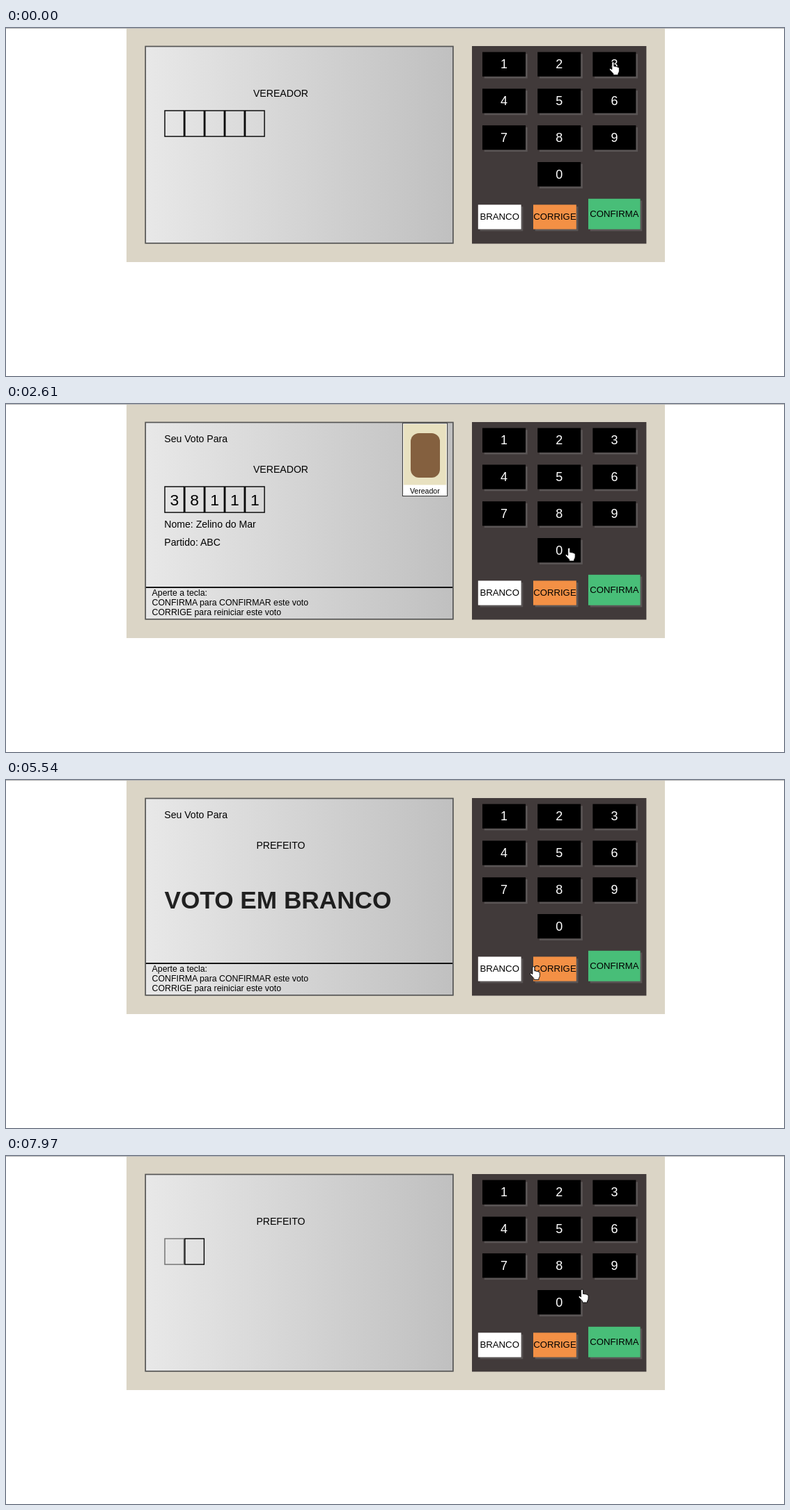
Recreate the animation shown at these times as an HTML page. Size 1117x501 px, loop 8 s.

```html
<!DOCTYPE html>
<html lang="pt-BR">
<head>
<meta charset="utf-8">
<title>Urna</title>
<style>
  html, body { margin: 0; width: 100%; height: 100%; overflow: hidden; background: #fff; }
  svg { display: block; font: 14.08px "Liberation Sans", Arial, sans-serif; }
  .mid { text-anchor: middle; }
  .key { font-size: 18px; fill: #fff; }
  .action { font-size: 13.2px; }
  .digit { font-size: 22.9px; }
  .help { font-size: 12.32px; }
  .big { font-size: 35.2px; font-weight: bold; }
</style>
</head>
<body>
<svg width="1117" height="501" viewBox="0 0 1117 501">
  <defs>
    <linearGradient id="glass">
      <stop stop-color="#e8e8e8"/><stop offset="1" stop-color="#c0c0c0"/>
    </linearGradient>
  </defs>
  <rect x="173" width="773" height="337" fill="#dbd5c6"/>
  <rect width="1117" height="1" fill="#b4b4b4"/>
  <rect x="200.2" y="26.5" width="441.7" height="283.3" fill="url(#glass)" stroke="#555" stroke-width="1.7"/>
  <rect x="669" y="26" width="250.4" height="284.5" fill="#413a3a"/>
  <g id="keys"></g>

  <text id="title" class="mid" x="394.5" y="98.5"></text>
  <g id="cells"></g>
  <text id="big" class="big" x="227.5" y="184.8"></text>
  <g id="summary">
    <text x="227.3" y="54.5">Seu Voto Para</text>
    <rect x="201" y="263.1" width="440" height="1.8"/>
    <g class="help">
      <text x="209.6" y="276.2">Aperte a tecla:</text>
      <text x="209.6" y="290.2">CONFIRMA para CONFIRMAR este voto</text>
      <text x="209.6" y="304.2">CORRIGE para reiniciar este voto</text>
    </g>
  </g>
  <g id="candidate">
    <text x="227.3" y="177.8">Nome: Zelino do Mar</text>
    <text x="227.3" y="204.2">Partido: ABC</text>
    <rect x="569.4" y="27.7" width="64.2" height="104.8" fill="#fff" stroke="#333"/>
    <rect x="570.8" y="29" width="61.4" height="87.5" fill="#e8e1c0"/>
    <rect x="581" y="42" width="42" height="64" rx="12" fill="#84603f"/>
    <text class="mid" x="601.3" y="129" font-size="10.56">Vereador</text>
  </g>

  <g id="cursor" fill="#fff" stroke="#000" stroke-width=".9" stroke-linejoin="round">
    <path id="hand" d="M-1.5 1.5Q-1.5 0 0 0T1.5 1.5V6.5Q3 5.7 4.1 7Q5.7 6.3 6.7 7.6Q9 7.2 9 9.5V13Q9 15 7.5 17V19H.5V17L-4.7 11.5Q-5.8 9.3 -3.5 9.5L-1.5 11Z"/>
    <path id="arrow" d="M0 0V16L3.7 12.6L6.1 18.2L8.5 17.2L6.1 11.8H11.1Z"/>
  </g>
</svg>
<script>
const LOOP = 8000, BLINK = 500;
const $ = id => document.getElementById(id);

const button = (label, x, y, w, h, fill) => ({ label, w, h, fill, cx: x + w / 2, cy: y + h / 2 });
const buttons = [
  ...[..."1234567890"].map((label, i) => {
    const col = i < 9 ? i % 3 : 1, row = Math.floor(i / 3);
    return button(label, 684 + 79.2 * col, 34.6 + 52.8 * row, 62, 35.2, "#000");
  }),
  button("BRANCO", 677.8, 254.4, 61.8, 35.2, "#fff"),
  button("CORRIGE", 757, 254.4, 61.8, 35.2, "#f39045"),
  button("CONFIRMA", 836, 245.8, 74.6, 43.9, "#48be78")
];
$("keys").innerHTML = buttons.map(({ label, cx, cy, w, h, fill }) => {
  const box = (shift, color) =>
    `<rect x="${cx - w / 2 + shift}" y="${cy - h / 2 + shift}" width="${w}" height="${h}" fill="${color}"/>`;
  const [kind, drop] = label.length === 1 ? ["key", 6] : ["action", 4.3];
  return box(2.7, "#5a5555") + box(0, fill) +
    `<text class="mid ${kind}" x="${cx}" y="${cy + drop}">${label}</text>`;
}).join("");

const PITCH = 28.9;
$("cells").innerHTML = [0, 1, 2, 3, 4].map(i => {
  const x = 227.3 + PITCH * i;
  return `<g><rect x="${x + .7}" y="119" width="${PITCH - 1.4}" height="37.1" fill="none" stroke="#000" stroke-width="1.4"/>
    <text class="mid digit" x="${x + PITCH / 2}" y="145.7"></text></g>`;
}).join("");
const cells = [...$("cells").children];

// The voter's path: button, sideways offset, arrival, departure, clicks
const visit = (label, dx, arrive, leave, ...clicks) => {
  const { cx, cy } = buttons.find(b => b.label === label);
  return { label, x: cx + dx, y: cy - 3.5, arrive, leave, clicks };
};
const visits = [
  visit("3", -2, 0, 380, 240),
  visit("8", -2, 620, 700, 650),
  visit("1", 23, 950, 2200, 1190, 1672, 2150),
  visit("8", -5, 2580, 2580),
  visit("0", 14, 2610, 2610),
  visit("CONFIRMA", -13, 2760, 3640, 3535),
  visit("BRANCO", 19, 4082, 5340, 4402),
  visit("CORRIGE", -26, 5600, 5720, 5665),
  visit("0", 1, 6060, 7220, 6560, 6955),
  visit("CORRIGE", 0, 7450, 7895, 7895),
  visit("6", 0, 8056, 8056)
];
const clicks = visits.flatMap(v => v.clicks.map(time => ({ time, label: v.label })));

function pointerAt(t) {
  const i = visits.findIndex(v => v.leave > t), to = visits[i], from = visits[i - 1];
  if (t >= to.arrive) return [to.x, to.y];
  const u = (t - from.leave) / (to.arrive - from.leave), k = u * u * (3 - 2 * u);
  return [from.x + (to.x - from.x) * k, from.y + (to.y - from.y) * k];
}

// Replays the clicks on the voting machine up to time t
function ballotAt(t) {
  const ballot = { office: "VEREADOR", size: 5, typed: "", blank: false, since: -340 };
  for (const { time, label } of clicks) {
    if (time > t) break;
    ballot.since = time;
    if (label.length === 1) { ballot.typed += label; continue; }
    if (label === "CONFIRMA") Object.assign(ballot, { office: "PREFEITO", size: 2 });
    ballot.typed = "";
    ballot.blank = label === "BRANCO";
  }
  return ballot;
}

// CSS "ease": cubic-bezier(.25, .1, .25, 1)
function ease(x) {
  const bezier = (a, b, s) => 3 * a * s * (1 - s) ** 2 + 3 * b * s * s * (1 - s) + s ** 3;
  let lo = 0, hi = 1;
  for (let i = 0; i < 14; i++) {
    const mid = (lo + hi) / 2;
    if (bezier(.25, .25, mid) < x) lo = mid; else hi = mid;
  }
  return bezier(.1, 1, lo);
}

// Fades in over half the period, then holds
const blink = age => ease(Math.min(1, age % BLINK / (BLINK / 2)));
const show = (el, on) => el.setAttribute("display", on ? "inline" : "none");

function render(t) {
  const { office, size, typed, blank, since } = ballotAt(t);
  const opacity = blink(t - since);
  const full = typed.length === size, chosen = typed === "38111";
  $("title").textContent = office;
  cells.forEach((cell, i) => {
    show(cell, i < size && !blank);
    cell.setAttribute("opacity", i === typed.length ? opacity : 1);
    cell.lastElementChild.textContent = typed[i] || "";
  });
  $("big").textContent = blank ? "VOTO EM BRANCO" : full && !chosen ? "VOTO NULO" : "";
  $("big").setAttribute("opacity", opacity);
  show($("summary"), full || blank);
  show($("candidate"), chosen);

  // The pointer shape trails the position slightly
  const [hx, hy] = pointerAt(Math.max(0, t - 10));
  const over = buttons.some(({ cx, cy, w, h }) =>
    Math.abs(hx - cx) < w / 2 + 2 && Math.abs(hy - cy) < h / 2 + 2);
  show($("hand"), over);
  show($("arrow"), !over);
  $("cursor").setAttribute("transform", `translate(${pointerAt(t)})`);
}

const origin = performance.now();
function tick() {
  render((performance.now() - origin) % LOOP);
  requestAnimationFrame(tick);
}
tick();
</script>
</body>
</html>
```
